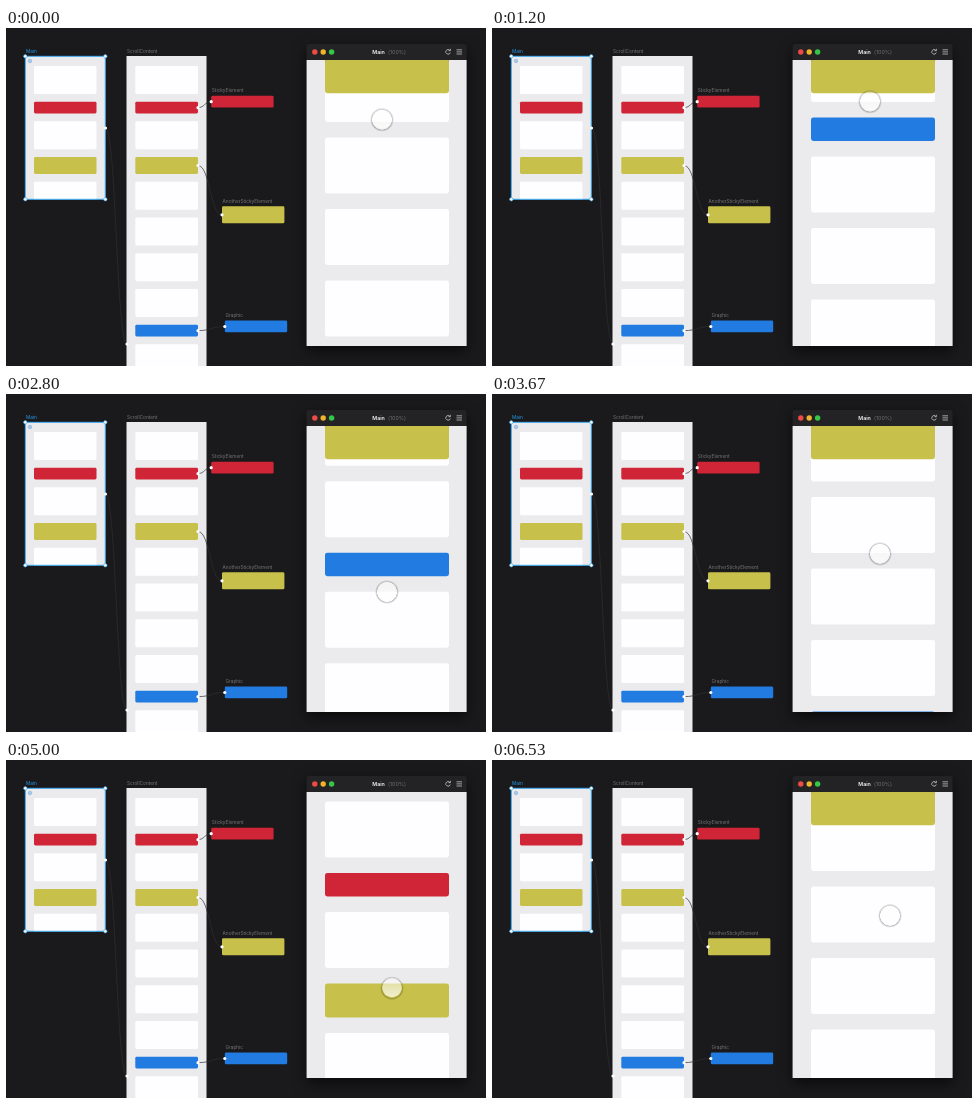
Animation of 480 by 338 pixels, one loop 6.59 s. Source, as an HTML page:

```html
<!DOCTYPE html>
<html lang="en">
<head>
<meta charset="utf-8">
<title>Sticky scroll preview</title>
<style>
html, body { margin: 0; width: 100%; height: 100%; overflow: hidden; background: #1a191b; }
svg { display: block; width: 480px; height: 338px; }
text { font: 4.75px Inter, Roboto, sans-serif; fill: #777679; }
.title { font-size: 5.3px; }
.wire { fill: none; stroke: #302f32; stroke-width: .7; }
.icon { fill: none; stroke: #d8d8da; stroke-width: .7; }
.window { filter: drop-shadow(0 5px 7px rgba(0, 0, 0, .6)); }
</style>
</head>
<body>
<svg viewBox="0 0 480 338">
  <defs>
    <clipPath id="mainClip"><rect x="19" y="28" width="80.5" height="143.5"/></clipPath>
    <clipPath id="viewClip"><rect x="300.6" y="32" width="160" height="286"/></clipPath>
    <linearGradient id="glass" x2="0" y2="1">
      <stop stop-color="#fff" stop-opacity=".4"/>
      <stop offset="1" stop-color="#fff" stop-opacity=".75"/>
    </linearGradient>
    <radialGradient id="halo">
      <stop offset=".8" stop-opacity="0"/>
      <stop offset=".84" stop-opacity=".25"/>
      <stop offset="1" stop-opacity="0"/>
    </radialGradient>
  </defs>

  <g clip-path="url(#mainClip)">
    <rect x="19" y="28" width="81" height="144" fill="#ebebed"/>
    <g id="mainItems"></g>
  </g>
  <rect x="19.3" y="28.3" width="80" height="143" fill="none" stroke="#2d9fe8"/>
  <circle cx="24" cy="33" r="1.8" fill="#a9c9e8" stroke="#6fa8dc" stroke-width=".5"/>
  <text x="20" y="25" style="fill:#2497e6">Main</text>

  <rect x="120.5" y="28" width="80" height="310" fill="#ebebed"/>
  <g id="listItems"></g>
  <text x="121" y="25">ScrollContent</text>
  <g id="parts"></g>
  <g id="wires"></g>
  <g id="dots"></g>

  <rect class="window" x="300.6" y="16" width="160" height="302" rx="2.5" fill="#232224"/>
  <g id="lights"></g>
  <text class="title" x="366.3" y="26" style="fill:#f2f2f3;font-weight:600">Main</text>
  <text class="title" x="382" y="26" style="fill:#6f6e71">(100%)</text>
  <path class="icon" d="M443.8 22.3a2.3 2.3 0 1 0 .5 2.2M444.4 20.8v1.9h-1.9"/>
  <path class="icon" d="M450.5 21.8h5.5M450.5 23.9h5.5M450.5 26h5.5"/>

  <g clip-path="url(#viewClip)">
    <rect x="300" y="32" width="161" height="286" fill="#ebebed"/>
    <g id="viewItems"></g>
    <g id="touch">
      <circle cy=".8" r="12" fill="url(#halo)"/>
      <circle r="9.8" fill="url(#glass)"/>
    </g>
  </g>
</svg>
<script>
const WHITE = '#fefdff', RED = '#d02437', YELLOW = '#c7c14b', BLUE = '#217be0';
const LOOP = 6590, FRAME = 200 / 3, TOP = 32, PIN = -.8;
const $ = id => document.getElementById(id);

function add(parent, tag, attrs) {
  const el = document.createElementNS('http://www.w3.org/2000/svg', tag);
  for (const k in attrs) el.setAttribute(k, attrs[k]);
  return $(parent).appendChild(el);
}
const box = (parent, x, y, width, height, fill, rx = 1.4) =>
  add(parent, 'rect', { x, y, width, height, fill, rx });
const dot = (cx, cy, r = 1.6, fill = '#fff', stroke = 'none') =>
  add('dots', 'circle', { cx, cy, r, fill, stroke, 'stroke-width': .6 });

function link(x0, y0, x1, y1) {
  const mid = (x0 + x1) / 2;
  add('wires', 'path', { class: 'wire', d: `M${x0} ${y0}C${mid} ${y0} ${mid} ${y1} ${x1} ${y1}` });
  dot(x0, y0);
  dot(x1, y1);
}

// Scroll content at preview scale; sticky bars also have a linked component.
const card = { fill: WHITE, h: 56 };
const red = { fill: RED, h: 23.5, part: 'StickyElement', px: 205.2, py: 67.8 };
const yellow = { fill: YELLOW, h: 34, part: 'AnotherStickyElement', px: 216, py: 178.3 };
const blue = { fill: BLUE, h: 23.5, part: 'Graphic', px: 218.8, py: 292.6 };
let nextY = 19;
const items = [card, red, card, yellow, card, card, card, card, blue, card, card, card, card].map(it => {
  const y = nextY;
  nextY += it.h + 15.5;
  return { ...it, y };
});
items.sort((a, b) => !!a.part - !!b.part);

for (const it of items) {
  const y = 28.5 + it.y / 2, h = it.h / 2;
  box('mainItems', 28, y, 62.5, h, it.fill);
  box('listItems', 129.3, y, 62.7, h, it.fill);
  it.el = box('viewItems', 319, 0, 124, it.h, it.fill, 2.4);
  if (!it.part) continue;
  box('parts', it.px, it.py, 62.4, h, it.fill);
  add('parts', 'text', { x: it.px + .6, y: it.py - 3.8 }).textContent = it.part;
  link(192, y + h / 2, it.px, it.py + h / 2);
}
link(99.5, 100, 121, 316);

for (const x of [19.3, 99.3])
  for (const y of [28.3, 171.3]) dot(x, y, 1.7, '#fff', '#2d9fe8');
['#ee4b46', '#f0b32e', '#35c748'].forEach((fill, i) =>
  add('lights', 'circle', { cx: 308.8 + i * 8.4, cy: 24, r: 2.7, fill }));

// While dragging, scroll + y stays at `grip`; between drags the list glides on.
const drags = [
  [0, 120, 376, 91, 76, 335.5],
  [620, 1220, 378, 187, 69, 552],
  [2050, 2900, 381, 71, 214, 607],
  [3380, 3980, 388, 90, 233, 410],
  [4950, 5450, 386, 237, 141, 237],
  [5870, 6200, 392, 201, 146, 323],
  [6470, LOOP, 398, 168, 142, 382.5]
].map(([start, end, x, from, to, grip]) => ({ start, end, x, from, to, grip }));

const mix = (a, b, u) => a + (b - a) * u;
const smooth = u => u * u * (3 - 2 * u);
const glide = u => u * (2 - u);

function pose(t) {
  const i = drags.findLastIndex(d => t >= d.start);
  const a = drags[i], b = drags[i + 1];
  if (t <= a.end) {
    const y = mix(a.from, a.to, (t - a.start) / (a.end - a.start));
    return { x: a.x, y, scroll: a.grip - y };
  }
  const u = (t - a.end) / (b.start - a.end);
  return {
    x: mix(a.x, b.x, smooth(u)),
    y: mix(a.to, b.from, smooth(u)),
    scroll: mix(a.grip - a.to, b.grip - b.from, glide(u))
  };
}

function draw(now) {
  const step = Math.floor((now % LOOP + 5) / FRAME);
  const { x, y, scroll } = pose(Math.min(Math.round(step * FRAME / 10) * 10, LOOP));
  for (const it of items) {
    const top = it.y - scroll;
    it.el.setAttribute('y', TOP + (it.part ? Math.max(PIN, top) : top));
  }
  $('touch').setAttribute('transform', `translate(${x} ${y})`);
}

let start;
function tick(now) {
  start ??= now;
  draw(now - start);
  requestAnimationFrame(tick);
}
draw(0);
requestAnimationFrame(tick);
</script>
</body>
</html>
```
